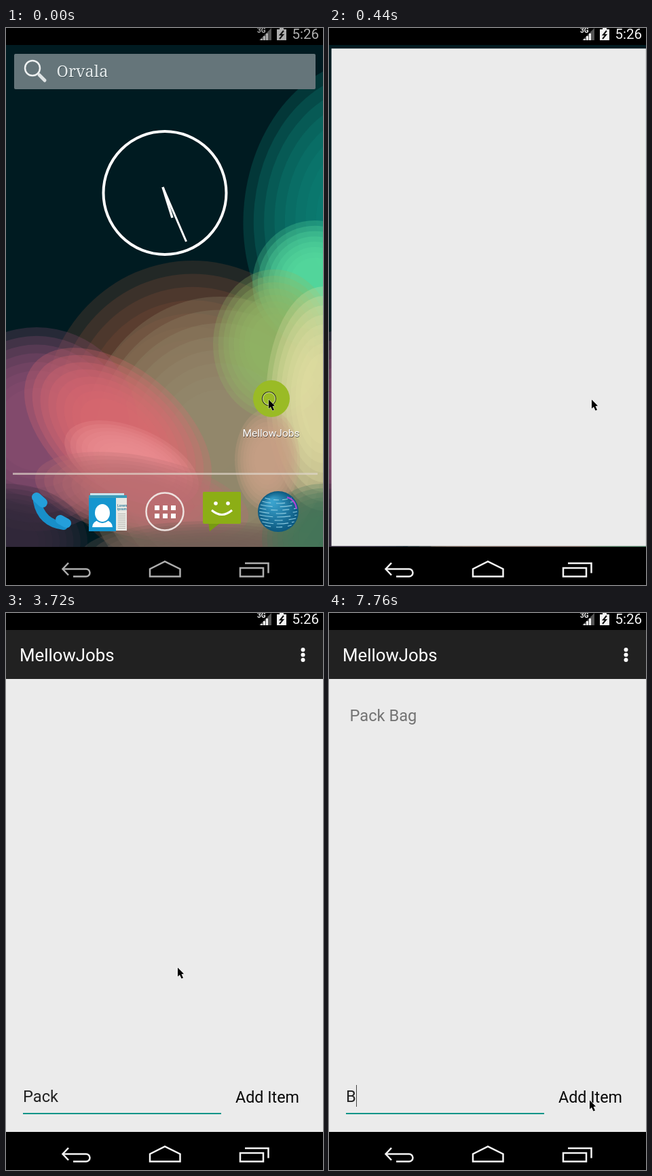
Write an HTML page with a canvas that moves like this. It is 467 px wide and 819 px high and loops after 8 s.

```html
<!DOCTYPE html>
<html lang="en">
<head>
<meta charset="utf-8">
<title>Todo app demo</title>
<style>
html, body { margin: 0; width: 100%; height: 100%; overflow: hidden; background: #000; }
canvas { display: block; width: 467px; height: 819px; }
</style>
</head>
<body>
<canvas id="stage" width="467" height="819"></canvas>
<script>
const W = 467, H = 819, LOOP = 8000, STEP = 150;
const TOP = 25, BOTTOM = 763;
const APP = 'MellowJobs', SEARCH = 'Orvala', ITEM = 'Pack Bag';
const SANS = 'Roboto, "Open Sans", sans-serif';
const stage = document.getElementById('stage').getContext('2d');
let c = stage;

function rect(x, y, w, h, color) {
  c.fillStyle = color;
  c.fillRect(x, y, w, h);
}
function round(x, y, w, h, r, color) {
  c.fillStyle = color;
  c.beginPath();
  c.roundRect(x, y, w, h, r);
  c.fill();
}
function oval(x, y, rx, ry, color, angle = 0) {
  c.fillStyle = color;
  c.beginPath();
  c.ellipse(x, y, rx, ry, angle, 0, 7);
  c.fill();
}
const disc = (x, y, r, color) => oval(x, y, r, r, color);
function ring(x, y, r, width, color) {
  c.strokeStyle = color;
  c.lineWidth = width;
  c.beginPath();
  c.arc(x, y, r, 0, 7);
  c.stroke();
}
function trace(points, close) {
  c.beginPath();
  for (let i = 0; i < points.length; i += 2) c.lineTo(points[i], points[i + 1]);
  if (close) c.closePath();
}
function poly(points, color) {
  trace(points, true);
  c.fillStyle = color;
  c.fill();
}
function line(points, width, color, close) {
  trace(points, close);
  c.strokeStyle = color;
  c.lineWidth = width;
  c.stroke();
}
function curve(x1, y1, cx, cy, x2, y2, width, color) {
  c.strokeStyle = color;
  c.lineWidth = width;
  c.beginPath();
  c.moveTo(x1, y1);
  c.quadraticCurveTo(cx, cy, x2, y2);
  c.stroke();
}
function text(str, x, y, font, color, align = 'left') {
  c.font = font;
  c.fillStyle = color;
  c.textAlign = align;
  c.fillText(str, x, y);
}

// Soft spot made of shrinking translucent ellipses
function glow(x, y, rx, ry, color, angle) {
  c.globalAlpha = 0.27;
  for (let k = 1; k > 0.4; k -= 0.085) oval(x, y, rx * k, ry * k, color, angle);
  c.globalAlpha = 1;
}

function wallpaper() {
  rect(0, TOP, W, BOTTOM - TOP, '#001b21');
  c.save();
  c.beginPath();
  c.rect(0, TOP, W, BOTTOM - TOP);
  c.clip();
  glow(275, 570, 220, 228, '#7d4c34');
  glow(315, 625, 205, 230, '#938d6e');
  glow(530, 275, 180, 230, '#0b8177', 0.1);
  glow(455, 375, 92, 92, '#58dc9f');
  glow(395, 465, 90, 110, '#8fb566');
  glow(468, 545, 85, 165, '#e0dfa2');
  glow(385, 635, 48, 75, '#c6a085');
  glow(45, 590, 150, 150, '#8b5072');
  glow(165, 595, 160, 95, '#d9676f', 0.68);
  glow(185, 640, 105, 52, '#e88d91', 0.4);
  glow(200, 690, 160, 60, '#b86b70', 0.2);
  glow(0, 755, 120, 85, '#352b3c');
  glow(300, 775, 190, 50, '#735d55');
  glow(467, 750, 90, 80, '#43785b');
  c.restore();
}

function searchBar() {
  round(12, 38, 444, 52, 2, '#65757a');
  c.lineCap = 'round';
  line([49, 69, 57, 77], 5, '#dfe4e5');
  c.lineCap = 'butt';
  ring(39, 59, 11, 2.5, '#eef1f1');
  const font = '23.5px "Noto Serif", serif';
  text(SEARCH, 75, 73, font, '#38494e');
  text(SEARCH, 74.5, 72, font, '#e3e9ea');
}

function clock() {
  ring(234, 242.5, 90.5, 4, '#fff');
  line([231, 234, 265.5, 314], 3, '#fff');
  line([231, 234, 245, 279], 3.5, '#fff');
}

function phoneIcon() {
  c.lineCap = 'round';
  curve(46, 696, 52, 728, 85, 732, 12, '#188fc9');
  line([45, 690, 54, 698], 14, '#249fda');
  line([80, 723, 89, 728], 14, '#249fda');
  c.lineCap = 'butt';
}

function contactsIcon() {
  rect(124, 684, 50, 6, '#c9e4ed');
  rect(122, 687, 56, 4, '#3c9cba');
  rect(122, 691, 40, 49, '#1696cf');
  rect(162, 691, 16, 48, '#e8e8e3');
  text('Lorem', 164, 704, 'bold 5px ' + SANS, '#4085a0');
  text('ipsum', 164, 709, 'bold 5px ' + SANS, '#4085a0');
  for (let y = 714; y < 736; y += 3) rect(165, y, 11, 1, '#b6b6b0');
  round(127, 724, 30, 10, [12, 12, 0, 0], '#fff');
  oval(142, 713, 13, 15, '#1696cf');
  oval(142, 713, 11, 13, '#fff');
}

function appsIcon() {
  ring(234, 711, 27.5, 2.5, '#eee2df');
  for (let i = 0; i < 6; i++) {
    rect(219 + i % 3 * 12, 702 + Math.floor(i / 3) * 12, 7, 7, '#fff');
  }
}

function messageIcon() {
  poly([298, 726, 318, 726, 300, 740], '#789a12');
  round(290, 682, 56, 47, 2, '#8cae15');
  for (const x of [309, 327]) disc(x, 699, 2.8, '#fff');
  curve(303, 709, 318, 722, 333, 709, 3, '#fff');
}

function globeIcon() {
  const g = c.createRadialGradient(392, 696, 3, 401, 711, 30);
  g.addColorStop(0, '#3aa2cd');
  g.addColorStop(1, '#0b587f');
  disc(401, 711, 30, g);
  for (let i = 0; i < 9; i++) {
    const y = 691 + i * 5, half = Math.sqrt(28 ** 2 - (y - 711) ** 2);
    c.setLineDash([8 + i * 5 % 13, 5 + i * 3 % 7]);
    curve(401 - half, y, 401, y + 6, 401 + half, y, 1.2, '#8ac9df');
  }
  c.setLineDash([]);
  curve(414, 690, 426, 693, 428, 707, 2, '#b143d5');
}

function makeHome() {
  const layer = document.createElement('canvas');
  layer.width = W;
  layer.height = H;
  c = layer.getContext('2d');
  wallpaper();
  searchBar();
  clock();
  rect(10, 654, 449, 3, 'rgba(225,215,205,.65)');
  phoneIcon();
  contactsIcon();
  appsIcon();
  messageIcon();
  globeIcon();
  c = stage;
  return layer;
}
const home = makeHome();

function launcher(pressed) {
  if (pressed) {
    const g = c.createRadialGradient(391, 545, 22, 391, 545, 40);
    g.addColorStop(0, 'rgba(255,250,225,.85)');
    g.addColorStop(1, 'rgba(255,250,225,0)');
    disc(391, 545, 40, g);
  }
  disc(391, 545, 27, '#9abb25');
  const font = '15.5px ' + SANS;
  text(APP, 391, 602, font, 'rgba(0,0,0,.6)', 'center');
  text(APP, 390.5, 601, font, '#fff', 'center');
}

function statusBar(color) {
  rect(0, 0, W, TOP, '#000');
  text('3G', 370, 7, 'bold 10px ' + SANS, color);
  poly([373, 18, 391, 0, 391, 18], '#555');
  for (let x = 375; x < 387; x += 4) rect(x, 391 - x, 3, x - 373, color);
  rect(399, 2, 14, 16, color);
  rect(403, 0, 6, 2, color);
  line([409, 4, 404, 10, 408, 10, 403, 16], 2, '#111');
  text('5:26', 461, 16, '20.5px ' + SANS, color, 'right');
}

function navBar(color) {
  const thick = 2.5;
  rect(0, BOTTOM, W, H - BOTTOM, '#000');
  c.save();
  c.translate(0, -0.5);
  line([92, 787, 83.5, 796, 92, 805], thick, color);
  line([84, 796, 118, 796], thick, color);
  c.beginPath();
  c.arc(118, 801.5, 5.5, -Math.PI / 2, Math.PI / 2);
  c.lineTo(99, 807);
  c.stroke();
  line([212, 807, 212, 796, 234, 785, 256.5, 796, 256.5, 807], thick, color, true);
  c.strokeRect(345, 794.5, 34, 12.5);
  line([352, 787.5, 386.5, 787.5, 386.5, 802], thick, color);
  c.restore();
}

// Opening window; rest is the part of the growth still to come
function openWindow(rest) {
  rect(36 * rest, TOP + 52 * rest, W - 37 * rest, BOTTOM - TOP - 65 * rest, '#ebebeb');
}

const ADDED = 6570;
const keys = [2670, 3120, 3270, 3420, 4170, 4170, 4470, 4620];
const caretSpans = [[590, 890], [1480, 1930], [2370, 3720], [4470, 5220], [ADDED, 7020], [7610, LOOP]];

function entryAt(t) {
  if (t >= ADDED) return t < 7760 ? '' : 'B';
  return ITEM.slice(0, keys.filter(k => k <= t).length);
}

function app(t) {
  const font = '23.7px ' + SANS;
  rect(0, TOP, W, BOTTOM - TOP, '#ebebeb');
  rect(0, TOP, W, 72, '#212121');
  text(APP, 20, 71, '25.8px ' + SANS, '#fff');
  for (let i = 0; i < 3; i++) disc(437.5, 54 + i * 7.5, 3, '#fff');
  if (t >= ADDED) text(ITEM, 30.5, 159, font, '#737373');

  const entry = entryAt(t);
  text(entry, 25, 719, font, '#222');
  if (caretSpans.some(([on, off]) => t >= on && t < off)) {
    rect(25 + Math.round(c.measureText(entry).width), 694, 1, 32, '#444');
  }
  rect(25, 735, 292, 2, '#079488');
  text('Add Item', 338, 720, '23.3px ' + SANS, '#080808');
}

// Eased pointer move, advancing once per STEP
function glide(t, start, steps, [x1, y1], [x2, y2]) {
  const k = Math.min(1, Math.max(0, (Math.floor((t - start) / STEP) + 1) / steps));
  const e = k * k * (3 - 2 * k);
  return [x1 + (x2 - x1) * e, y1 + (y2 - y1) * e];
}
function pointerAt(t) {
  const icon = [387, 546], mid = [247, 547], rest = [253, 521], button = [384, 716];
  if (t < 1930) return glide(t, 1330, 4, icon, mid);
  if (t < 5220) return rest;
  return glide(t, 5220, 4, rest, button);
}

function cursor(t) {
  const [x, y] = pointerAt(t);
  if (t < STEP || (t >= 6270 && t < 6270 + STEP)) {
    ring(x + 0.5, y - 1, 10, 1.2, '#2a2e22');
    ring(x + 0.5, y - 1, 9, 0.8, 'rgba(255,255,255,.75)');
  }
  c.save();
  c.translate(x, y + 0.5);
  const arrow = [0, 0, 0, 13, 3, 10.5, 5.5, 16, 8, 15, 5.5, 9.5, 9, 9];
  line(arrow, 1, 'rgba(255,255,255,.8)', true);
  poly(arrow, '#000');
  c.restore();
}

function draw(t) {
  if (t < 590) {
    c.drawImage(home, 0, 0);
    launcher(t >= STEP);
    if (t >= 300) openWindow(t < 440 ? 1 : 0.1);
  } else {
    app(t);
  }
  const color = t < 300 ? '#aeaeae' : '#f4f4f4';
  statusBar(color);
  navBar(color);
  cursor(t);
}

const start = performance.now();
function tick(now) {
  draw(Math.max(0, now - start) % LOOP);
  requestAnimationFrame(tick);
}
draw(0);
requestAnimationFrame(tick);
</script>
</body>
</html>
```
